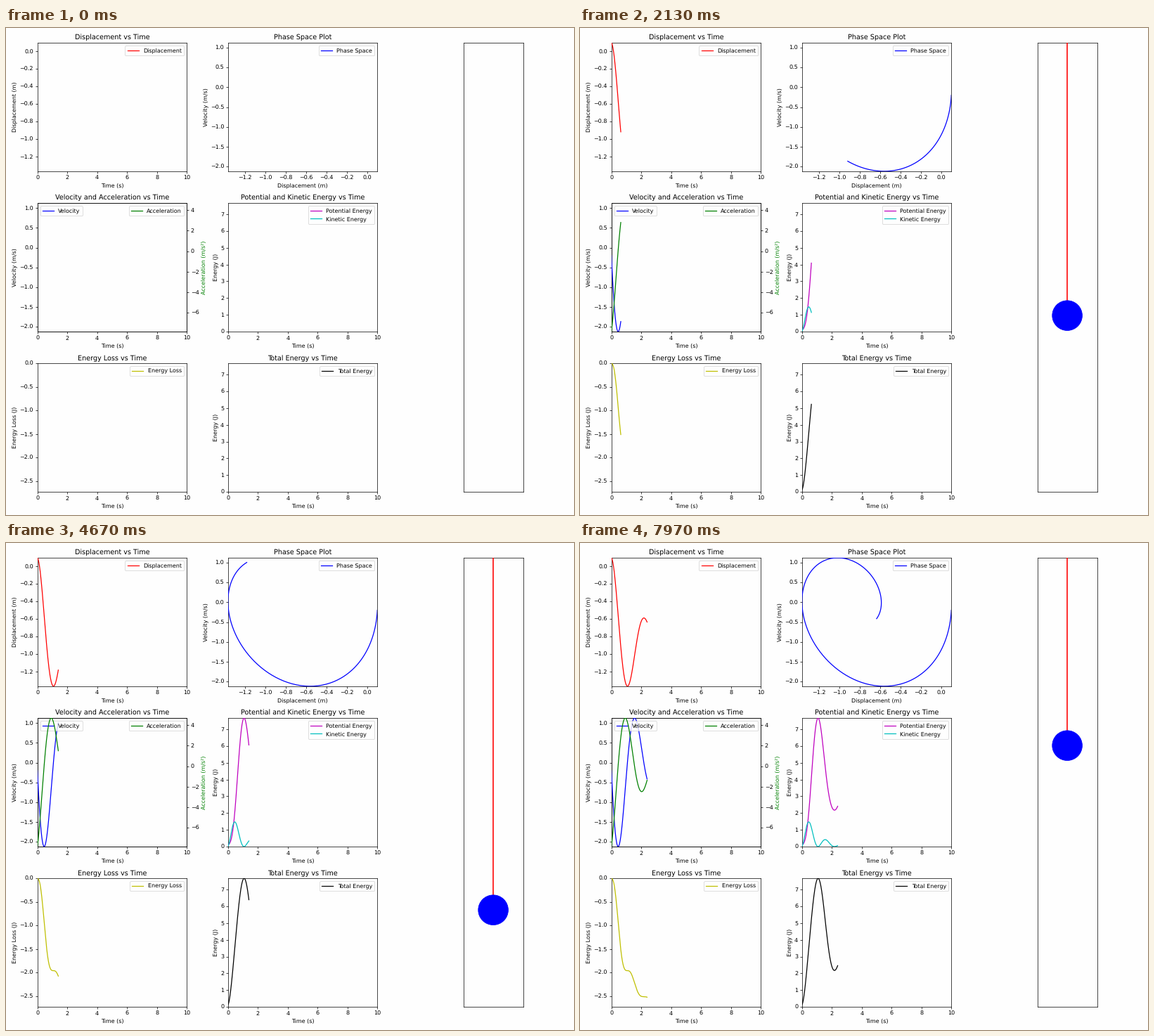
A matplotlib script that plays this animation: 808 by 693 pixels, repeating every 8000 ms.

```python
import numpy as np
import matplotlib.pyplot as plt
from matplotlib.animation import FuncAnimation
from matplotlib.patches import Circle
from matplotlib.ticker import MultipleLocator

W, H, DPI = 808, 693, 64
FRAMES, LOOP_MS = 240, 8000
PAPER = '#fefefe'

plt.rcParams.update({
    'font.family': 'DejaVu Sans', 'font.size': 9, 'axes.titlesize': 10.8,
    'axes.titlepad': 5.4, 'axes.labelpad': 3.6, 'axes.linewidth': 0.8,
    'lines.linewidth': 1.4, 'patch.linewidth': 0.9,
    'xtick.major.size': 3.15, 'ytick.major.size': 3.15,
    'xtick.major.width': 0.8, 'ytick.major.width': 0.8,
    'xtick.major.pad': 3.15, 'ytick.major.pad': 3.15,
    'axes.facecolor': PAPER, 'figure.facecolor': PAPER,
    'savefig.facecolor': PAPER, 'text.hinting': 'none',
})

# Damped mass on a spring under gravity, explicit Euler steps
M, K, C, G, REST = 0.65, 5.5, 0.8, 9.81, 0.3
DT, STEPS = 0.01, 1000


def simulate():
    x, v, a = np.zeros((3, STEPS))
    x[0], v[0] = 0.1, -0.2
    for i in range(STEPS):
        a[i] = -G - K / M * (x[i] - REST) - C / M * v[i]
        if i + 1 < STEPS:
            x[i + 1] = x[i] + v[i] * DT
            v[i + 1] = v[i] + a[i] * DT
    return x, v, a


def span(data):
    return data.min(), data.max()


t = np.arange(STEPS) * DT
x, v, a = simulate()
potential = 0.5 * K * (x - REST) ** 2
kinetic = 0.5 * M * v ** 2
total = potential + kinetic
loss = -np.cumsum(C * v ** 2) * DT

TIME = (0, 10)
ENERGY = (0, total.max())
BOB_XLIM = (-0.1, 0.1)
BOB_YLIM = (-1.508, -0.008)

# row, col, title, x label, y label, limits, tick steps, curves
PANELS = [
    (0, 0, 'Displacement vs Time', 'Time (s)', 'Displacement (m)',
     TIME, span(x), 2, 0.2, [(t, x, 'r', 'Displacement')]),
    (0, 1, 'Phase Space Plot', 'Displacement (m)', 'Velocity (m/s)',
     span(x), span(v), 0.2, 0.5, [(x, v, 'b', 'Phase Space')]),
    (1, 0, 'Velocity and Acceleration vs Time', 'Time (s)', 'Velocity (m/s)',
     TIME, span(v), 2, 0.5, [(t, v, 'b', 'Velocity')]),
    (1, 1, 'Potential and Kinetic Energy vs Time', 'Time (s)', 'Energy (J)',
     TIME, ENERGY, 2, 1, [(t, potential, 'm', 'Potential Energy'),
                          (t, kinetic, 'c', 'Kinetic Energy')]),
    (2, 0, 'Energy Loss vs Time', 'Time (s)', 'Energy Loss (J)',
     TIME, (loss.min(), 0), 2, 0.5, [(t, loss, 'y', 'Energy Loss')]),
    (2, 1, 'Total Energy vs Time', 'Time (s)', 'Energy (J)',
     TIME, ENERGY, 2, 1, [(t, total, 'k', 'Total Energy')]),
]

fig = plt.figure(figsize=(W / DPI, H / DPI), dpi=DPI)


def draw_frames():
    """Draw all that never changes; return the axes."""
    grid = fig.add_gridspec(3, 3)
    panels = []
    for row, col, title, xlab, ylab, xlim, ylim, dx, dy, curves in PANELS:
        ax = fig.add_subplot(grid[row, col], title=title, xlabel=xlab,
                             ylabel=ylab, xlim=xlim, ylim=ylim)
        ax.xaxis.set_major_locator(MultipleLocator(dx))
        ax.yaxis.set_major_locator(MultipleLocator(dy))
        panels.append(ax)
        if curves[0][3] == 'Velocity':
            twin = ax.twinx()
            twin.set_ylim(span(a))
            twin.yaxis.set_major_locator(MultipleLocator(2))
            twin.set_ylabel('Acceleration (m/s²)', color='g')
            twin.plot([], [], 'g', label='Acceleration')
            twin.legend(loc='upper right')
            continue
        for _, _, color, label in curves:
            ax.plot([], [], color, label=label)
        ax.legend(loc='upper right')
    bob_panel = fig.add_subplot(grid[:, 2], xticks=[], yticks=[],
                                xlim=BOB_XLIM, ylim=BOB_YLIM, aspect='equal')
    fig.tight_layout()
    return panels, bob_panel


def bare_axes(box, xlim, ylim):
    ax = fig.add_axes(box, xlim=xlim, ylim=ylim)
    ax.axis('off')
    return ax


# Render the fixed part once and keep it as a backdrop
panels, bob_panel = draw_frames()
fig.canvas.draw()
backdrop = np.array(fig.canvas.buffer_rgba())
boxes = [ax.get_position() for ax in panels]
bob_box = bob_panel.get_position()
fig.clear()
fig.figimage(backdrop, zorder=-1)

tracks = []


def add_track(ax, xs, ys, color, label):
    line, = ax.plot([], [], color, label=label)
    tracks.append((line, xs, ys))


for box, (_, _, _, _, _, xlim, ylim, _, _, curves) in zip(boxes, PANELS):
    ax = bare_axes(box, xlim, ylim)
    for curve in curves:
        add_track(ax, *curve)
    if curves[0][3] == 'Velocity':
        # The curves pass behind and over this legend, so it stays live
        ax.legend(loc='upper left')
        twin = bare_axes(box, TIME, span(a))
        add_track(twin, t, a, 'g', 'Acceleration')

bob_ax = bare_axes(bob_box, BOB_XLIM, BOB_YLIM)
spring, = bob_ax.plot([], [], 'r', lw=1.8, zorder=1)
bob = bob_ax.add_patch(Circle((0, x[0]), 0.05, color='b', lw=0.9, zorder=2))


def update(i):
    for line, xs, ys in tracks:
        line.set_data(xs[:i + 1], ys[:i + 1])
    spring.set_data([0, 0], [0.2, x[i]])
    bob.center = (0, x[i])
    bob.set_visible(i > 0)
    spring.set_visible(x[i] < 0)
    return [line for line, _, _ in tracks] + [spring, bob]


anim = FuncAnimation(fig, update, frames=FRAMES, init_func=lambda: update(0),
                     interval=LOOP_MS / FRAMES, repeat=True, repeat_delay=0)
plt.show()
```
